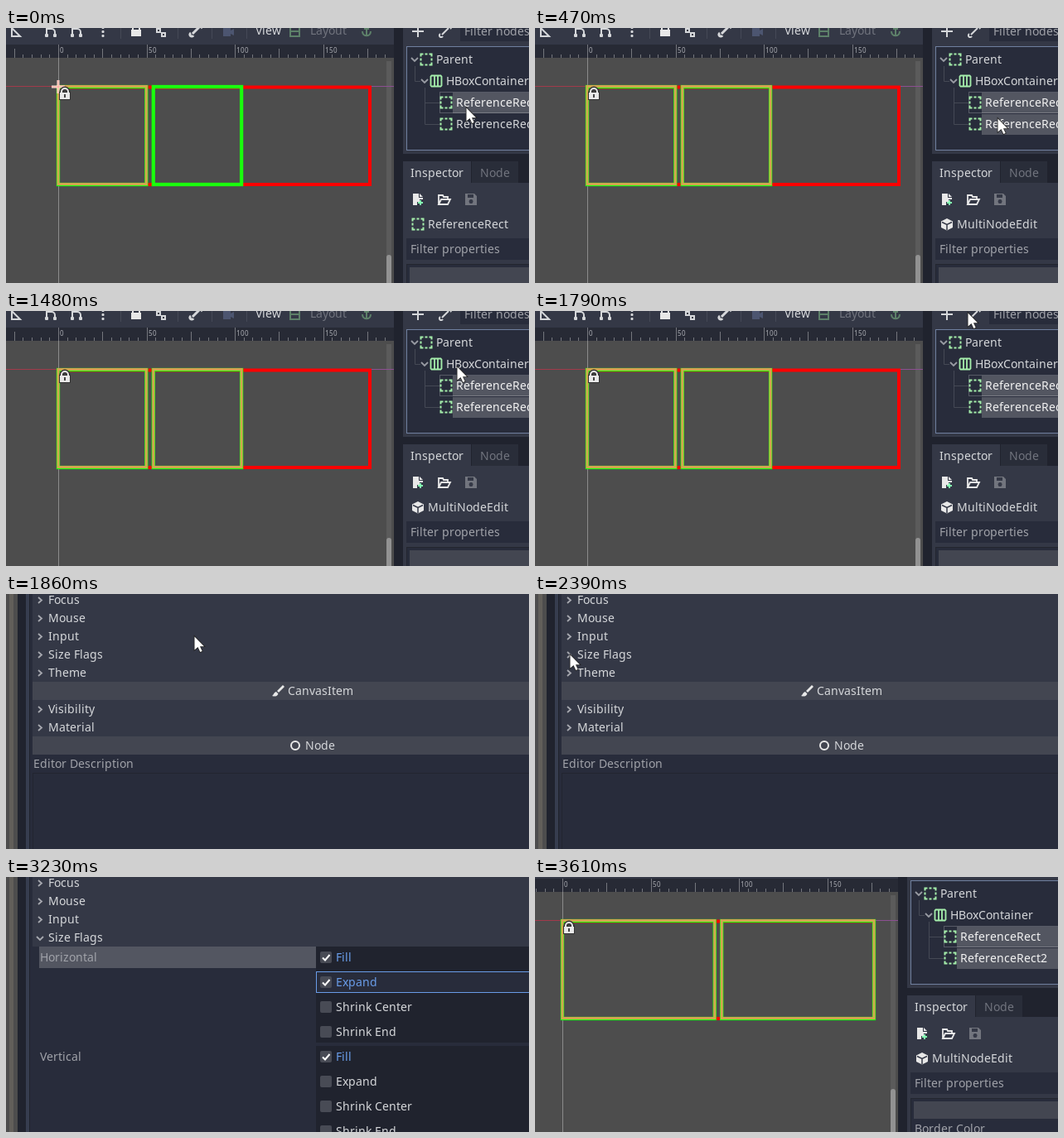
Animation of 631 by 308 pixels, one loop 4.65 s. Source, as an HTML page with a canvas:

```html
<!DOCTYPE html>
<html lang="en">
<head>
<meta charset="utf-8">
<title>Size flags in the editor</title>
<style>
html, body { margin: 0; width: 100%; height: 100%; overflow: hidden; background: #4d4d4d; }
canvas { display: block; }
</style>
</head>
<body>
<canvas id="stage" width="631" height="308"></canvas>
<script>
const LOOP = 4650;
const ctx = document.getElementById('stage').getContext('2d');
const C = {
  base: '#343846', dark: '#282c3b', deep: '#20232e', ruler: '#272a35', view: '#4d4d4d',
  bar: '#434651', select: '#535661', text: '#d5d7da', dim: '#a0a2a9', faint: '#71747e',
  mint: '#a5efac', white: '#e8e8e8', blue: '#699ce8', red: '#ff0000', green: '#1aff0d'
};

function box(color, x, y, w, h) {
  ctx.fillStyle = color;
  ctx.fillRect(x, y, w, h);
}

function frame(color, x, y, w, h, width = 1) {
  ctx.strokeStyle = color;
  ctx.lineWidth = width;
  ctx.strokeRect(x, y, w, h);
}

function rounded(color, x, y, w, h, r) {
  ctx.fillStyle = color;
  ctx.beginPath();
  ctx.roundRect(x, y, w, h, r);
  ctx.fill();
}

// The editor lays its glyphs out on whole pixels.
function text(string, x, y, color = C.text, size = 14) {
  ctx.font = `${size}px "Noto Sans", sans-serif`;
  ctx.fillStyle = color;
  for (const glyph of string) {
    ctx.fillText(glyph, x, y);
    x += Math.round(ctx.measureText(glyph).width);
  }
}

function draw(d, x, y, { fill, stroke, width = 2 }) {
  const path = new Path2D(d);
  ctx.save();
  ctx.translate(x, y);
  if (stroke) {
    ctx.strokeStyle = stroke;
    ctx.lineWidth = width;
    ctx.stroke(path);
  }
  if (fill) {
    ctx.fillStyle = fill;
    ctx.fill(path);
  }
  ctx.restore();
}

const ICON = {
  rect: 'M1 4V1H4M6 1H9M11 1H14V4M14 6V9M14 11V14H11M9 14H6M4 14H1V11M1 9V6',
  hbox: 'M2 1H13L14 2V13L13 14H2L1 13V2ZM5.5 1V14M9.5 1V14',
  lockBody: 'M1 6H13V14H1Z',
  lockBow: 'M3 7V5A4 4 0 0 1 11 5V7',
  page: 'M0 0H7V5H12V7H8V10H5V14H0ZM8 0L12 4H8Z',
  plus: 'M9 8V14M6 11H12',
  folder: 'M1 13V2H6L7 4H12V6M1 13L4 7H15L12 13Z',
  floppy: 'M0 0H11L14 3V14H0ZM3 1V5H10V1ZM7 7A2.5 2.5 0 1 0 7.1 7Z',
  cube: 'M7 0L14 3.5V11L7 14.5L0 11V3.5Z',
  cubeEdges: 'M1 4.5L7 7.5L13 4.5M7 7.5V14',
  brush: 'M13 0L15 2L8 9L6 7ZM5 8L7.5 10.5C6 14 3 14 0 13C2 12 2 9 5 8Z',
  right: 'M1 1L5 4.5L1 8',
  down: 'M0 1L4 5L8 1',
  tick: 'M3 7.5L6 10.5L11.5 4',
  bone: 'M2 11L10 3M0 10A2.2 2.2 0 1 0 3 13M9 1A2.2 2.2 0 1 1 12 4',
  pointer: 'M0 0V16L4 12.5L6.8 18.5L9.2 17.5L6.5 11.8H11.5Z'
};

function lock(x, y, outlined) {
  if (outlined) {
    draw(ICON.lockBow, x, y, { stroke: '#333', width: 5 });
    draw(ICON.lockBody, x, y, { stroke: '#333', width: 2 });
  }
  draw(ICON.lockBow, x, y, { stroke: C.white });
  draw(ICON.lockBody, x, y, { fill: C.white });
  if (outlined) box('#444', x + 6, y + 8, 2, 4);
}

function toolbar() {
  box(C.base, 0, 0, 468, 20);
  draw('M7 0V10H17Z', 0, 0, { stroke: C.text });
  for (const x of [48, 79]) {
    draw('M1 0V10M11 10V5A4 4 0 0 0 7 1H1', x, 0, { stroke: C.text });
    rounded(C.text, x - 1, 7, 4, 4, 1);
    rounded(C.text, x + 9, 7, 4, 4, 1);
  }
  for (const y of [-2, 3, 8]) rounded(C.text, 115.5, y, 3, 3, 1);
  lock(150, -4);
  draw('M1 1H5V5H1ZM7 6H11V10H7Z', 181, 0, { stroke: C.text });
  draw(ICON.bone, 223, -4, { stroke: C.text, width: 3 });
  draw('M0 0H9V3L13 1V9L9 7V10H0Z', 262, 0, { fill: '#4c5570' });
  for (const x of [138, 207, 248, 290]) box('#454956', x, 0, 1, 13);
  text('View', 301, 8);
  draw('M1 0V10H12V0M1 4H12', 342, 0, { stroke: '#5d8069' });
  text('Layout', 367, 8, C.faint);
  draw('M6 -3V10M1 4C1 11 11 11 11 4M3 1H9', 429, 0, { stroke: '#5d8069' });
}

function ruler() {
  const unit = 2.13;
  box(C.ruler, 0, 20, 468, 16);
  for (let n = -5; n < 38; n++) {
    const x = Math.floor(63.5 + n * 5 * unit);
    if (x > 467) break;
    const height = n % 10 === 0 ? 16 : n % 5 === 0 ? 11 : 4;
    box('#74767d', x, 36 - height, 1, height);
    if (n >= 0 && n % 10 === 0) text(String(n * 5), x + 2, 30, '#aaacb2', 8);
  }
}

function viewport({ both, wide }) {
  const top = 71, height = 118, left = 63, full = 376, gap = 8.5;
  const width = wide ? (full - gap) / 2 : 106.3;
  box(C.view, 0, 0, 468, 330);
  box('#5b5b5b', 459, 40, 6, 300);
  rounded('#929292', 459, 274, 6, 80, 3);
  box('#a13a4a', 0, 70, 63, 1);
  box('#8c4f92', 63, 70, 405, 1);
  box('#8b8b8b', 63, 36, 1, 300);
  frame(C.red, left, top + .5, full, height - .5, 4);
  const xs = [left, left + width + gap];
  for (const x of xs) frame(C.green, x, top, width, height, 4.3);
  for (const x of both ? xs : xs.slice(0, 1)) {
    frame('rgba(255,145,95,.8)', x, top - .5, width, height, 3);
  }
  if (!both) {
    draw('M0 -8V8M-8 0H8', 63, 71, { stroke: '#ffe4df', width: 3 });
    draw('M0 -8V8M-8 0H8', 63, 71, { stroke: '#ff9f91', width: 1 });
  }
  lock(64, 72, true);
  toolbar();
  ruler();
}

function sceneDock(second) {
  box(C.base, 479, 0, 200, 152);
  draw('M7 0V14M0 7H14', 490, -3, { stroke: C.text });
  draw(ICON.bone, 524, -3, { stroke: C.text });
  box(C.dark, 548, 0, 130, 16);
  text('Filter nodes', 553, 9, C.dim);
  box(C.dark, 483, 22, 200, 126);
  frame('#70809f', 483.5, 22.5, 200, 125);
  draw('M493.5 46V64.5H500M505.5 72V116.5H523M505.5 90.5H523', 0, 0, { stroke: '#454955', width: 1 });
  draw(ICON.down, 489, 35, { stroke: '#989ba3', width: 1.8 });
  draw(ICON.down, 501, 61, { stroke: '#989ba3', width: 1.8 });
  draw(ICON.rect, 499.5, 30.5, { stroke: C.mint });
  draw(ICON.hbox, 511.5, 56.5, { stroke: C.mint, width: 1.8 });
  text('Parent', 519, 43);
  text('HBoxContainer', 531, 69);
  box(C.select, 539, 78, 140, 25);
  if (second) box(C.select, 539, 104, 140, 25);
  frame('rgba(255,255,255,.22)', 523.5, 77.5, 150, 25);
  ['ReferenceRect', 'ReferenceRect2'].forEach((name, i) => {
    draw(ICON.rect, 523.5, 82.5 + 26 * i, { stroke: C.mint });
    text(name, 543, 95 + 26 * i, i === 0 || second ? '#f2f2f2' : C.text);
  });
}

function inspectorDock(both) {
  box(C.base, 479, 161, 82, 27);
  box('#292d39', 562, 161, 56, 26);
  box(C.base, 479, 187, 200, 150);
  text('Inspector', 488, 180);
  text('Node', 572, 180, C.faint);
  draw(ICON.page, 491, 200, { fill: C.white });
  draw(ICON.plus, 491, 200, { stroke: '#84ffb1' });
  draw(ICON.folder, 521, 200, { stroke: C.white, width: 1.8 });
  ctx.save();
  ctx.globalAlpha = .35;
  draw(ICON.floppy, 554, 200, { fill: C.white });
  box(C.base, 557, 201, 6, 4);
  box(C.base, 559, 208, 4, 4);
  ctx.restore();
  if (both) {
    draw(ICON.cube, 490, 230, { fill: C.white });
    draw(ICON.cubeEdges, 490, 230, { stroke: C.base, width: 1.5 });
  } else {
    draw(ICON.rect, 489.5, 229.5, { stroke: C.mint });
  }
  text(both ? 'MultiNodeEdit' : 'ReferenceRect', 509, 242);
  box(C.dark, 483, 254, 200, 26);
  text('Filter properties', 488, 272, C.dim);
  box(C.dark, 483, 285, 200, 60);
  frame('#23262f', 483.5, 285.5, 200, 60);
  box(C.bar, 487, 289, 200, 21);
  text('Border Color', 488, 327, C.dim);
}

function editor(state) {
  box(C.deep, 0, 0, 680, 330);
  viewport(state);
  sceneDock(state.second);
  inspectorDock(state.both);
}

function tooltip() {
  box('rgba(0,0,0,.2)', 566, 117, 80, 31);
  box('#e6e6e6', 568, 119, 80, 28);
  text('Type: ReferenceRect', 573, 138, '#3a3a3a');
}

function section(name, y, open) {
  draw(open ? ICON.down : ICON.right, open ? 37 : 38, open ? y - 2 : y - 4,
    { stroke: '#a6a8af', width: 1.8 });
  text(name, 51, y + 5);
}

function header(name, x, y) {
  box(C.bar, 32, y, 599, 22);
  text(name, x, y + 16);
}

function flags(name, y, states) {
  text(name, 41, y + 18, C.dim);
  box(C.deep, 374, y, 257, 116);
  ['Fill', 'Expand', 'Shrink Center', 'Shrink End'].forEach((label, i) => {
    const rowY = y + 30 * i;
    const { checked, focused, hovered } = states[i] || {};
    if (focused) {
      box(C.dark, 374, rowY, 260, 26);
      frame(C.blue, 374.5, rowY + .5, 260, 25);
    }
    rounded('#484b55', 379, rowY + 6, 14, 14, 2);
    if (checked) draw(ICON.tick, 379, rowY + 6, { stroke: '#fff' });
    text(label, 398, rowY + 18, checked ? C.blue : hovered ? '#fff' : C.text);
  });
}

function sections(t) {
  const open = t >= 2470;
  box(C.view, 0, 0, 14, 308);
  box('#625f5a', 4, 0, 5, 308);
  box(C.deep, 14, 0, 10, 308);
  box('#363d4f', 24, 0, 4, 308);
  box(C.dark, 28, 0, 603, 308);
  box('#20232d', 28, 0, 1, 308);
  box(C.base, 32, 0, 599, open ? 84 : 194);
  ['Focus', 'Mouse', 'Input'].forEach((name, i) => section(name, 7 + 22 * i));
  section('Size Flags', 73, open);
  if (open) {
    const clicked = t >= 3000;
    if (clicked) box(C.select, 40, 84, 334, 26);
    flags('Horizontal', 84, [{ checked: true }, { checked: clicked, focused: clicked, hovered: t >= 2850 }]);
    flags('Vertical', 204, [{ checked: true }]);
    return;
  }
  section('Theme', 95);
  header('CanvasItem', 340, 106);
  draw(ICON.brush, 321, 110, { fill: C.white });
  section('Visibility', 139);
  section('Material', 161);
  header('Node', 361, 172);
  draw('M5 0A5 5 0 1 1 -5 0A5 5 0 1 1 5 0Z', 349, 183, { stroke: C.white });
  text('Editor Description', 33, 210, C.dim);
  frame('#222530', 32.5, 216.5, 620, 120);
}

// Each glide moves in hard steps spread evenly over [start, end].
const GLIDES = [
  { start: 80, end: 230, steps: 3, from: [555, 96], to: [558, 109] },
  { start: 1330, end: 1790, steps: 7, from: [558, 109], to: [522, 2] },
  { start: 1930, end: 2390, steps: 7, from: [227, 51], to: [42, 73] },
  { start: 2850, end: 2850, steps: 1, from: [42, 73], to: [385, 133] }
];

function pointerAt(t) {
  const begins = [0, 1330, 1860, 2850];
  const glide = GLIDES[begins.filter(time => t >= time).length - 1];
  const { start, end, steps, from, to } = glide;
  const interval = steps > 1 ? (end - start) / (steps - 1) : 0;
  let done = 0;
  while (done < steps && t >= 10 * Math.floor((start + done * interval) / 10)) done++;
  const p = done / steps;
  const eased = p * p * (3 - 2 * p);
  return from.map((value, i) => Math.round(value + (to[i] - value) * eased));
}

function render(t) {
  ctx.setTransform(1, 0, 0, 1, 0, 0);
  if (t < 1860) {
    editor({ second: t >= 400, both: t >= 470, wide: false });
    if (t >= 1020 && t < 1330) tooltip();
  } else if (t < 3610) {
    sections(t);
  } else {
    ctx.translate(-30, -18);
    editor({ second: true, both: true, wide: true });
  }
  if (t < 3230) {
    const [x, y] = pointerAt(t);
    draw(ICON.pointer, x + .5, y + .5, { stroke: '#222', width: 1.6, fill: '#fff' });
  }
}

const began = performance.now();
function tick() {
  render((performance.now() - began) % LOOP);
  requestAnimationFrame(tick);
}
tick();
</script>
</body>
</html>
```
